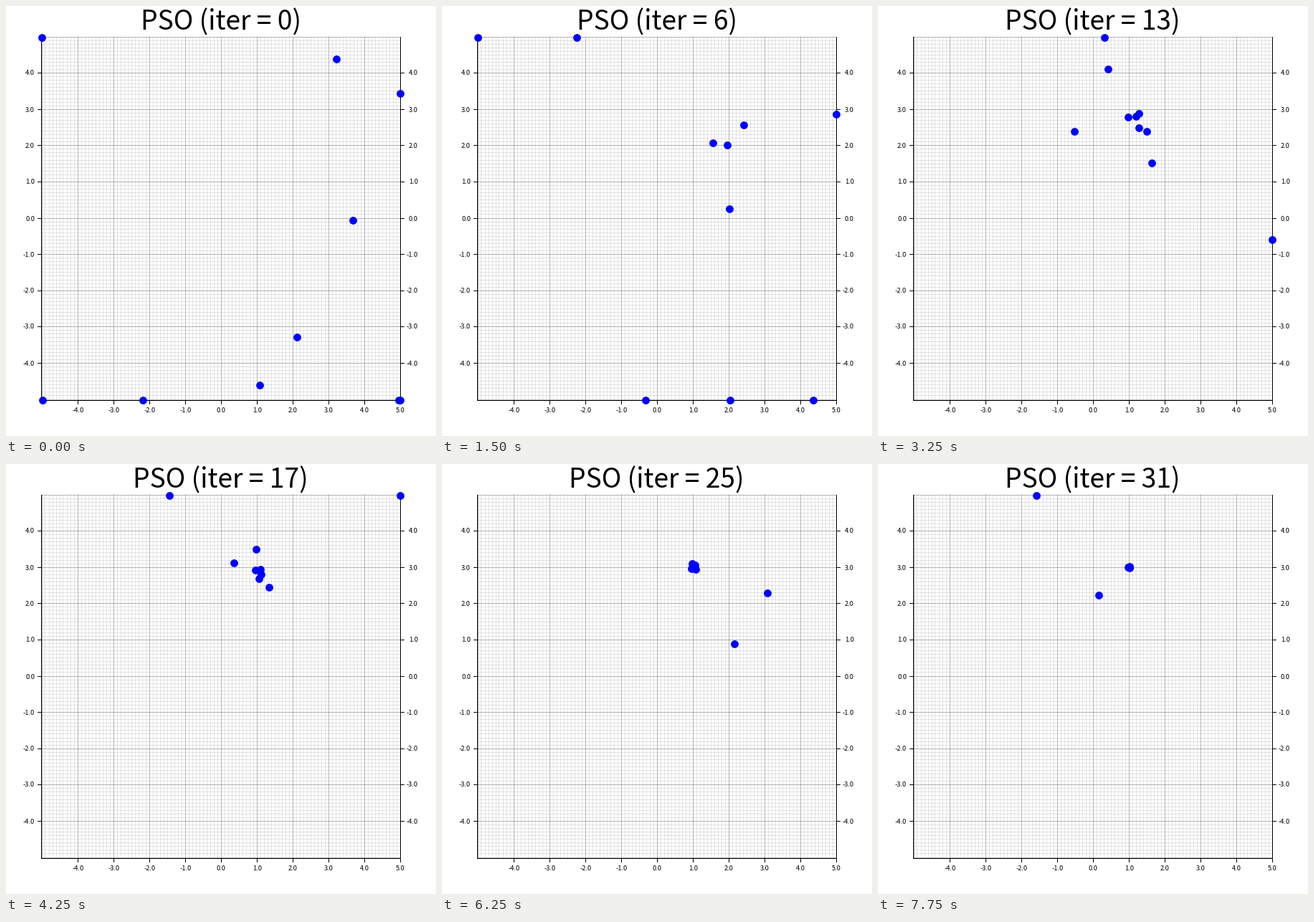
A matplotlib script for the animation above (8 s loop, 600 px wide and 600 px high).

```python
import numpy as np
import matplotlib.pyplot as plt
from matplotlib.animation import FuncAnimation
from matplotlib.patches import Circle

SIZE, DPI = 600, 100
PX = 72 / DPI  # points per pixel
FRAMES, INTERVAL = 32, 250
LEFT, RIGHT, TOP, BOTTOM = 50, 550, 43, 550
FONT = ["Noto Sans CJK JP", "DejaVu Sans"]

# Points are complex pixel positions, x + y*1j.
HOME = 350 + 144j
TURN = 6  # iteration at which the swarm starts to close in
DECAY = 0.23

# Eight particles that settle on the optimum: first position and position at TURN.
START = np.array([50 + 44j, 461 + 74j, 550 + 122j, 484 + 299j,
                  406 + 462j, 354 + 529j, 191 + 550j, 548 + 550j])
SPREAD = np.array([50 + 44j, 421 + 166j, 550 + 151j, 398 + 194j,
                   401 + 283j, 378 + 191j, 284 + 550j, 402 + 550j])

# Two particles that keep roaming through a few stops.
STOPS = [0, 6, 10, 13, 17, 25, 31]
ROAMERS = [
    [51 + 550j, 188 + 44j, 356 + 163j, 316 + 44j, 228 + 44j, 408 + 251j, 308 + 183j],
    [550 + 550j, 518 + 550j, 550 + 334j, 550 + 326j, 550 + 44j, 454 + 180j, 221 + 44j],
]

rng = np.random.default_rng(4)
BEND = rng.uniform(-0.3, 0.3, START.size)
SPIN = rng.uniform(-0.15, 0.15, START.size)


def arc(a, b, u, bend):
    """Point at fraction u of a bowed path from a to b."""
    return a + (b - a) * (u + 1j * bend * np.sin(np.pi * u))


def settle(n):
    if n < TURN:
        return arc(START, SPREAD, n / TURN, BEND)
    return HOME + (SPREAD - HOME) * np.exp((1j * SPIN - DECAY) * (n - TURN))


def roam(stops, n):
    k = min(np.searchsorted(STOPS, n, side="right"), len(STOPS) - 1) - 1
    u = (n - STOPS[k]) / (STOPS[k + 1] - STOPS[k])
    return arc(stops[k], stops[k + 1], u, 0.3)


def swarm(n):
    """Pixel centres of all particles, kept inside the plot."""
    z = np.append(settle(n), [roam(stops, n) for stops in ROAMERS])
    xy = np.column_stack([z.real, z.imag])
    return np.clip(np.rint(xy), (LEFT, TOP + 1), (RIGHT, BOTTOM)) + 0.5


fig = plt.figure(figsize=(SIZE / DPI, SIZE / DPI), dpi=DPI, facecolor="white")
ax = fig.add_axes([0, 0, 1, 1])
ax.set_xlim(0, SIZE)
ax.set_ylim(SIZE, 0)
ax.axis("off")


def col(x):
    return np.floor(300 + 50 * x) + 0.5


def row(y):
    return np.floor(296 - 50.6 * y) + 0.5


def vline(x, y0, y1, alpha=1):
    ax.vlines(x, y0, y1, colors="black", alpha=alpha, linewidth=PX, snap=False)


def hline(y, x0, x1, alpha=1):
    ax.hlines(y, x0, x1, colors="black", alpha=alpha, linewidth=PX, snap=False)


def grid(values, alpha):
    vline(col(values), TOP, BOTTOM, alpha)
    hline(row(values), LEFT, RIGHT, alpha)


def label(x, y, value, align):
    ax.text(x, y, f"{value:.1f}", size=9.3 * PX, family=FONT, ha=align, va="baseline")


grid(np.arange(-50, 51) / 10, 0.1)
grid(np.arange(-5, 6), 0.2)
vline([LEFT - 0.5, RIGHT + 0.5], TOP, BOTTOM + 1)
hline(BOTTOM + 0.5, LEFT - 1, RIGHT + 1)

for v in range(-4, 6):
    vline(col(v), BOTTOM, BOTTOM + 6)
    label(col(v), 567, v, "center")
    if v < 5:
        y = row(v)
        hline([y, y], [LEFT - 6, RIGHT], [LEFT, RIGHT + 6])
        label(40, y + 3, v, "right")
        label(575, y + 3, v, "right")

title = ax.text(299.5, 33.5, "", size=37.2 * PX, family=FONT, ha="center", va="baseline")
dots = [ax.add_patch(Circle(p, 5.4, color="#0000ff", linewidth=0, zorder=5))
        for p in swarm(0)]


def draw(n):
    title.set_text(f"PSO (iter = {n})")
    for dot, p in zip(dots, swarm(n)):
        dot.center = p
    return [title, *dots]


anim = FuncAnimation(fig, draw, frames=FRAMES, interval=INTERVAL, repeat=True, repeat_delay=0)
plt.show()
```
